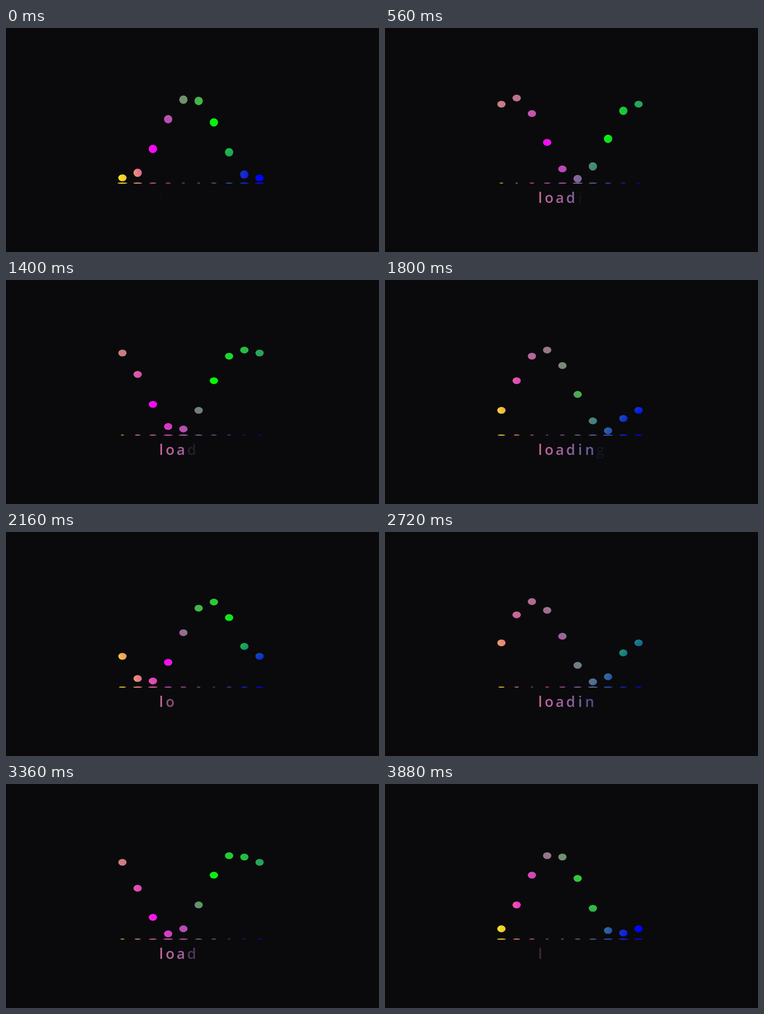
Recreate the animation shown at these times as an HTML page with a canvas. Size 700 by 420 pixels, loop 3.92 s.

```html
<!DOCTYPE html>
<html lang="en">
<head>
<meta charset="utf-8">
<title>Loading</title>
<style>
  html, body { margin: 0; width: 100%; height: 100%; overflow: hidden; background: #0a0a0c; }
  canvas { display: block; }
</style>
</head>
<body>
<canvas id="stage" width="700" height="420"></canvas>
<script>
const W = 700, H = 420;
const BACKGROUND = '#0a0a0c';
const LOOP = 3920, STEP = 40, LEAD_IN = 80;
const BALLS = 10, BALL_DELAY = 120, BOUNCE = 1000, BOUNCE_OFFSET = 47;
const TEXT_START = 78, TEXT_CYCLE = 960;
const LETTERS = [['l', 291.2], ['o', 308], ['a', 328], ['d', 348.5], ['i', 366.2], ['n', 384], ['g', 404]];
const BASELINE = 327.5;

const ctx = document.getElementById('stage').getContext('2d');
const clamp = v => Math.min(1, Math.max(0, v));

// Four colour points blended by inverse squared distance.
const COLOR_POINTS = [
  { x: 183, y: 266, rgb: [255, 255, 0] },
  { x: 289, y: 228, rgb: [255, 0, 255] },
  { x: 402, y: 188, rgb: [0, 255, 0] },
  { x: 488, y: 277, rgb: [0, 0, 255] }
];

function makeGradient() {
  const layer = document.createElement('canvas');
  layer.width = W;
  layer.height = H;
  const g = layer.getContext('2d');
  const image = g.createImageData(W, H);
  for (let y = 0, k = 0; y < H; y++) {
    for (let x = 0; x < W; x++, k += 4) {
      let sum = 0, r = 0, gr = 0, b = 0;
      for (const p of COLOR_POINTS) {
        const weight = 1 / ((x - p.x) ** 2 + (y - p.y) ** 2 + 0.5);
        sum += weight;
        r += weight * p.rgb[0];
        gr += weight * p.rgb[1];
        b += weight * p.rgb[2];
      }
      image.data[k] = r / sum;
      image.data[k + 1] = gr / sum;
      image.data[k + 2] = b / sum;
      image.data[k + 3] = 255;
    }
  }
  g.putImageData(image, 0, 0);
  return layer;
}

const gradient = makeGradient();

function ellipse(x, y, rx, ry, alpha) {
  ctx.globalAlpha = alpha;
  ctx.beginPath();
  ctx.ellipse(x, y, rx, ry, 0, 0, Math.PI * 2);
  ctx.fill();
}

function drawBall(i, t) {
  const delay = (i % (BALLS - 1)) * BALL_DELAY;
  const turn = (t - delay - BOUNCE_OFFSET) / BOUNCE;
  const phase = turn - Math.floor(turn);
  const x = 218.5 + 28.6 * i;
  const y = 206.4 + 76.2 * Math.cos(phase * Math.PI * 2);
  const nearness = Math.abs(phase * 2 - 1);
  const squash = clamp((t - delay) / 80);
  ellipse(x, 290.8, 2 + 8 * nearness, 1.3, 0.5 + 0.5 * nearness);
  ellipse(x, y, 7.8, 7.8 - 1.4 * squash, 1);
}

function drawText(t) {
  const shown = ((t - TEXT_START) % TEXT_CYCLE) / TEXT_CYCLE * LETTERS.length;
  ctx.font = '600 27px "Open Sans", "Noto Sans", sans-serif';
  ctx.textAlign = 'center';
  LETTERS.forEach(([letter, x], i) => {
    ctx.globalAlpha = clamp(shown - i);
    ctx.fillText(letter, x, BASELINE);
  });
}

function draw(now) {
  const t = LEAD_IN + Math.floor((now % LOOP) / STEP) * STEP;
  ctx.globalCompositeOperation = 'source-over';
  ctx.clearRect(0, 0, W, H);
  ctx.fillStyle = '#fff';
  for (let i = 0; i < BALLS; i++) drawBall(i, t);
  drawText(t);

  // Tint every shape with the gradient, then put the backdrop behind.
  ctx.globalAlpha = 1;
  ctx.globalCompositeOperation = 'source-in';
  ctx.drawImage(gradient, 0, 0);
  ctx.globalCompositeOperation = 'destination-over';
  ctx.fillStyle = BACKGROUND;
  ctx.fillRect(0, 0, W, H);
  requestAnimationFrame(draw);
}

draw(0);
</script>
</body>
</html>
```
